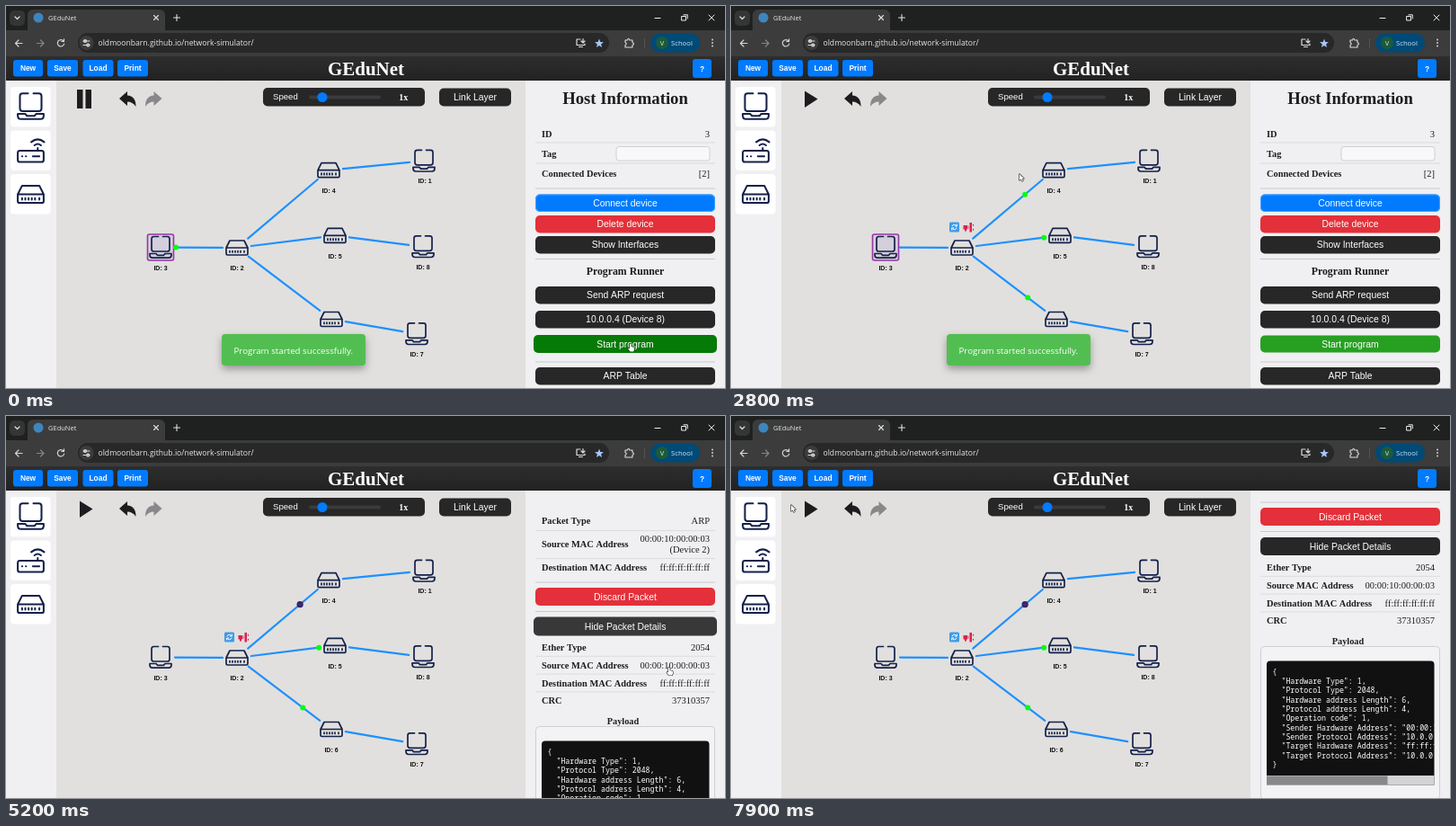
An HTML page with a canvas that plays this animation: 800 px wide and 425 px high, repeating every 8 s.

```html
<!DOCTYPE html>
<html lang="en">
<head>
<meta charset="utf-8">
<title>GEduNet</title>
<style>
html, body { margin: 0; width: 100%; height: 100%; overflow: hidden; background: #e1e0de; }
canvas { display: block; }
</style>
</head>
<body>
<canvas id="stage" width="800" height="425"></canvas>
<script>
const g = document.getElementById('stage').getContext('2d');
const SANS = '"Liberation Sans", Arial, sans-serif';
const SERIF = '"Liberation Serif", "Times New Roman", serif';
const UI = '"Open Sans", "Noto Sans", sans-serif';
const MONO = '"Noto Sans Mono", monospace';
const DARK = '#272728', BLUE = '#007bff', RED = '#e3303a', NAVY = '#14204a', INK = '#1d1d1f';
const LOOP = 8000, STEP = 100;
const ARRIVE = 950, PAUSE = 2300, SELECT = 3700, DETAILS = 4850;

// Basic drawing helpers
function box(x, y, w, h, r, fill, stroke, lw = 1) {
  g.beginPath();
  g.roundRect(x, y, w, h, r);
  if (fill) { g.fillStyle = fill; g.fill(); }
  if (stroke) { g.strokeStyle = stroke; g.lineWidth = lw; g.stroke(); }
}
function text(s, x, y, font, color, align = 'left') {
  g.font = font;
  g.fillStyle = color;
  g.textAlign = align;
  g.fillText(s, x, y);
}
function dot(x, y, r, fill) {
  g.beginPath();
  g.arc(x, y, r, 0, 7);
  g.fillStyle = fill;
  g.fill();
}
function stroke(d, color, lw, x = 0, y = 0, k = 1) {
  g.save();
  g.translate(x, y);
  g.scale(k, k);
  g.lineCap = g.lineJoin = 'round';
  g.strokeStyle = color;
  g.lineWidth = lw;
  g.stroke(new Path2D(d));
  g.restore();
}
function fill(d, color) {
  g.fillStyle = color;
  g.fill(new Path2D(d));
}
function button(label, y, h, color = DARK, hover = false) {
  const o = hover ? 2 : 0;
  box(589 - o, y - o / 4, 200 + 2 * o, h + o / 2, 5, color);
  text(label, 689, y + h / 2 + 3.7, `10.4px ${SANS}`, '#fff', 'center');
}
function rule(y, color = '#c9c9cb') {
  g.fillStyle = color;
  g.fillRect(589, y - 0.5, 200, 1);
}
function row(label, value, y) {
  text(label, 596, y + 3.5, `bold 10.4px ${SERIF}`, INK);
  if (value) text(value, 783, y + 3.5, `10.5px ${SERIF}`, INK, 'right');
}
function heading(s, y, size = 18.7) {
  text(s, 689, y, `bold ${size}px ${SERIF}`, INK, 'center');
}

// Interpolates [time, ...values] keyframes with smooth easing
function at(keys, t) {
  let i = 0;
  while (i < keys.length - 2 && t >= keys[i + 1][0]) i++;
  const [a, b] = [keys[i], keys[i + 1]];
  const u = Math.min(1, Math.max(0, (t - a[0]) / (b[0] - a[0])));
  const e = u * u * (3 - 2 * u);
  return a.slice(1).map((v, n) => v + (b[n + 1] - v) * e);
}

const PC = 'M-2.5-12H-7.5Q-10-12-10-9.5V2Q-10 4.5-7.5 4.5H7.5Q10 4.5 10 2V-9.5Q10-12 7.5-12H2.5' +
  'M-12 7H-5L-3.5 8.8H3.5L5 7H12V8.5Q12 11.7 9 11.7H-9Q-12 11.7-12 8.5Z';
const SWITCH = 'M-8-8H8L12 0V6.5Q12 8 10.5 8H-10.5Q-12 8-12 6.5V0ZM-12 0H12' +
  'M-8 3.5V5M-5 3.5V5M-2 3.5V5M1 3.5V5M4 3.5V5M8 3.5V5';
const ROUTER = 'M-10 0H10Q12 0 12 2V8.5Q12 10.5 10 10.5H-10Q-12 10.5-12 8.5V2Q-12 0-10 0ZM6.5 0V-2.5' +
  'M-8 5.2H-7.8M-4.5 5.2H-4.3M2 5.2H8M3.5-5Q6.5-7.5 9.5-5M.5-8Q6.5-13 12.5-8';

const nodes = {
  1: [465, 172.3, PC, 197], 2: [257, 269, SWITCH, 294], 3: [172, 268.5, PC, 294],
  4: [359, 182.7, SWITCH, 207.5], 5: [366, 255.4, SWITCH, 280.5], 6: [362, 348.5, SWITCH, 373.5],
  7: [457, 364.8, PC, 390], 8: [464, 267.8, PC, 293]
};
const links = [[3, 2], [2, 4], [2, 5], [2, 6], [4, 1], [5, 8], [6, 7]];

// Point on the way from a to b, d pixels past the start of the visible link
function along(a, b, d) {
  const [x, y] = nodes[a], [u, v] = nodes[b], len = Math.hypot(u - x, v - y);
  const k = (d + 16) / len;
  return [x + (u - x) * k, y + (v - y) * k];
}

function browser() {
  g.fillStyle = '#1f2020';
  g.fillRect(0, 0, 800, 28);
  box(4, 5, 17, 17, 5, '#343535');
  stroke('M10 12L12.5 14.5L15 12', '#ddd', 1.2);
  box(24, 4, 153, 30, 6, '#3c3c3c');
  g.fillRect(0, 27, 800, 29);
  dot(36, 13, 5.5, '#3d86bd');
  text('GEduNet', 47, 16, `7.5px ${UI}`, '#e8e8e8');
  stroke('M164.5 10.5L169.5 15.5M169.5 10.5L164.5 15.5M190 9.5V16.5M186.5 13H193.5', '#e2e2e2', 1.1);
  stroke('M722 13.5H728M752 11.5H756.5V16H752ZM754 9.8H758.3V14M782 10L788 16M788 10L782 16', '#eee', 1);
  stroke('M18 41.5H10.5M14 38L10.5 41.5L14 45', '#d5d5d5', 1.2);
  stroke('M34.5 41.5H42M38.5 38L42 41.5L38.5 45', '#858585', 1.2);
  stroke('M64 39A3.7 3.7 0 1 0 64.7 42M64.5 36.8V39.5H61.8', '#d5d5d5', 1.2);
  box(80, 30, 591, 22, 11, '#282828');
  dot(89.5, 41, 8, '#3c3c3c');
  stroke('M86 39H87M90 39H93M86 43.5H89M92.5 43.5H93', '#ddd', 1.1);
  g.strokeStyle = '#ddd';
  for (const [x, y] of [[88, 39], [91.2, 43.5]]) {
    g.beginPath();
    g.arc(x, y, 1.3, 0, 7);
    g.stroke();
  }
  text('oldmoonbarn.github.io/network-simulator/', 102.5, 44.2, `8.6px ${UI}`, '#e6e6e6');
  stroke('M639 37H635V43.5H644V42M637.5 45.5H641.5M642 36.5V40.5M640 39L642 41L644 39', '#ddd', 1.2);
  g.beginPath();
  for (let i = 0; i < 10; i++) {
    const a = i * Math.PI / 5 - Math.PI / 2, r = i % 2 ? 2.2 : 5.2;
    g.lineTo(660 + r * Math.cos(a), 41.8 + r * Math.sin(a));
  }
  g.fillStyle = '#a8c7fa';
  g.fill();
  stroke('M689 38H691.5Q692.5 34.5 694 38H697V40.5Q700 42 697 43.5V46H689V43.5Q691.5 42 689 40.5Z', '#ddd', 1.1);
  g.fillStyle = '#555';
  g.fillRect(710, 36, 1, 11);
  box(717, 30.5, 55, 21, 10.5, '#004a77');
  dot(730, 41, 7, '#1d5a39');
  text('V', 730, 44, `7.5px ${UI}`, '#d8eadf', 'center');
  text('School', 740, 44, `7.7px ${UI}`, '#cfe5fb');
  for (const y of [37.5, 41, 44.5]) dot(786, y, 0.9, '#ddd');
}

function header() {
  const shade = g.createLinearGradient(0, 55, 0, 83);
  shade.addColorStop(0, '#2e2e2f');
  shade.addColorStop(1, '#222223');
  g.fillStyle = shade;
  g.fillRect(0, 56, 800, 27);
  text('GEduNet', 400.5, 77, `bold 21px ${SERIF}`, '#fff', 'center');
  for (const [s, x, w] of [['New', 8, 33], ['Save', 46, 34], ['Load', 85.5, 34], ['Print', 124, 34]]) {
    box(x, 60, w, 18.5, 3, BLUE);
    text(s, x + w / 2, 72.3, `bold 8.4px ${SANS}`, '#fff', 'center');
  }
  box(764, 59, 21, 21, 3, BLUE);
  text('?', 774.5, 72.5, `bold 8.4px ${SANS}`, '#fff', 'center');
}

function sidebar() {
  g.fillStyle = '#f0f0f2';
  g.fillRect(0, 82, 56, 343);
  [[PC, 111.7], [ROUTER, 161], [SWITCH, 209.5]].forEach(([icon, y], i) => {
    box(5, 90 + i * 48.5, 44.5, 44.5, 4, '#fff');
    stroke(icon, NAVY, 1.7, 27.5, y, 1.2);
  });
}

function controls(paused) {
  if (paused) fill('M82 94.5L96.5 103.5L82 113Z', INK);
  else fill('M79 93H85.5V114H79ZM88.5 93H95V114H88.5Z', INK);
  const arrow = 'M126 103L135 95V99.5Q144.5 100 144.5 112Q141 106.5 135 106.5V111Z';
  fill(arrow, INK);
  g.save();
  g.translate(299.5, 0);
  g.scale(-1, 1);
  fill(arrow, '#88888a');
  g.restore();
  box(286, 91, 180, 20.5, 5, DARK);
  text('Speed', 297, 104.3, `9.6px ${SANS}`, '#fff');
  box(337, 99.5, 80, 4, 2, '#3b3b3d');
  dot(352, 101.5, 5.5, BLUE);
  text('1x', 442.3, 104.8, `bold 10px ${SERIF}`, '#fff', 'center');
  box(482, 91.5, 80, 20, 5, DARK);
  text('Link Layer', 522, 105.2, `10.4px ${SANS}`, '#fff', 'center');
}

function network(t) {
  for (const [a, b] of links) {
    const [x, y] = along(a, b, 0), [u, v] = along(b, a, 0);
    stroke(`M${x} ${y}L${u} ${v}`, '#1e90ff', 2.2);
  }
  const picked = t >= SELECT;
  if (!picked) box(157.5, 254, 29, 29, 2, '#d3cfdb', '#9a35a8', 1.6);
  for (const id in nodes) {
    const [x, y, icon, base] = nodes[id];
    stroke(icon, NAVY, 1.7, x, y);
    text('ID: ' + id, x + (id == 1 ? 1 : 0), base, `bold 7px ${SANS}`, '#111', 'center');
  }
  if (t < ARRIVE) {
    dot(...along(3, 2, 1 + t * 0.055), 3, '#0f1');
    return;
  }
  const d = (Math.min(t, PAUSE) - ARRIVE) * 0.0562;
  for (const id of [4, 5, 6]) dot(...along(2, id, d), 3, '#0f1');
  if (picked) {
    const [x, y] = along(2, 4, d);
    dot(x, y, 3.6, '#2c2570');
    dot(x, y, 1.7, '#6a1f48');
  }
  box(243, 240.5, 11, 11, 1.5, '#3d9be9');
  stroke('M246 245A2.8 2.8 0 0 1 251 244.5M251.3 243V245H249.3M251 247A2.8 2.8 0 0 1 246 247.5M245.7 249V247H247.7', '#fff', 1);
  fill('M258.5 244H263V248.5H258.5ZM265.5 241H268V251.5H265.5ZM260 248.5H262V250.5H260Z', '#d8234e');
  fill('M263 244.5H265.5V248H263Z', '#ea8aa2');
  stroke('M269.5 243.5V244M269.5 248.5V249', '#d8234e', 1.3);
}

function toast(alpha) {
  if (alpha <= 0) return;
  g.save();
  g.globalAlpha = alpha;
  g.shadowColor = '#0005';
  g.shadowBlur = 9;
  g.shadowOffsetY = 4;
  box(240, 365, 160, 35, 4, '#52be52');
  g.shadowColor = 'transparent';
  text('Program started successfully.', 253.5, 386.5, `9.75px ${UI}`, '#fff');
  g.restore();
}

function hostPanel(t) {
  heading('Host Information', 108.7);
  row('ID', '3', 142);
  rule(152, '#dcdcde');
  row('Tag', '', 164);
  box(679, 156.5, 104, 15.5, 3, '#f8f8fa', '#d0d0d3');
  rule(175, '#dcdcde');
  row('Connected Devices', '[2]', 186.5);
  rule(203);
  button('Connect device', 209.5, 19.5, BLUE);
  box(589.5, 210, 199, 18.5, 5, null, '#4aa0ff');
  button('Delete device', 233, 19.5, RED);
  button('Show Interfaces', 256, 19.5);
  rule(281.5);
  heading('Program Runner', 299, 11.8);
  button('Send ARP request', 312, 19.5);
  button('10.0.0.4 (Device 8)', 339, 19.5);
  const hover = t < 400;
  button('Start program', 366.5, 19, hover ? '#067a06' : '#27a022', hover);
  rule(396);
  button('ARP Table', 402, 19.5);
}

const payload = ['{', '  "Hardware Type": 1,', '  "Protocol Type": 2048,',
  '  "Hardware address Length": 6,', '  "Protocol address Length": 4,', '  "Operation code": 1,',
  '  "Sender Hardware Address": "00:00:10:00:00:03",', '  "Sender Protocol Address": "10.0.0.1",',
  '  "Target Hardware Address": "ff:ff:ff:ff:ff:ff",', '  "Target Protocol Address": "10.0.0.4"', '}'];

function packetPanel(t) {
  const open = t >= DETAILS, mac = '00:00:10:00:00:03', all = 'ff:ff:ff:ff:ff:ff';
  g.translate(0, -at([[5000, 0], [5200, 46], [5700, 135]], t)[0]);
  heading('Packet Information', 129);
  row('Packet Type', 'ARP', 162.5);
  rule(173.5, '#dcdcde');
  row('Source MAC Address', '', 188.5);
  row('', mac, 182.5);
  row('', '(Device 2)', 194.5);
  rule(204.5, '#dcdcde');
  row('Destination MAC Address', all, 214);
  rule(231);
  button('Discard Packet', 237, 20, RED);
  rule(263.5);
  const hover = t > 4500 && t < 5400;
  button(`${open ? 'Hide' : 'Show'} Packet Details`, 270, 20, hover ? '#383839' : DARK, hover);
  if (!open) return;
  [['Ether Type', '2054'], ['Source MAC Address', mac], ['Destination MAC Address', all], ['CRC', '37310357']]
    .forEach(([label, value], i) => {
      row(label, value, 303.5 + i * 19.8);
      if (i) rule(293.5 + i * 19.8, '#dcdcde');
    });
  text('Payload', 686.5, 388.5, `bold 10.3px ${SERIF}`, INK, 'center');
  box(589.5, 391.5, 199, 170, 4, '#f3f3f5', '#cfcfd2');
  box(596, 407.5, 186.5, 138, [4, 4, 0, 0], '#111112');
  g.save();
  g.clip();
  payload.forEach((s, i) => text(s, 602.5, 422.5 + i * 10.35, `500 8.28px ${MONO}`, '#fff'));
  g.fillStyle = '#d3d3d5';
  g.fillRect(596, 535, 187, 11);
  g.fillStyle = '#88888a';
  g.fillRect(596, 535.5, 134.5, 9.5);
  g.restore();
}

const path = [[0, 694, 376], [300, 694, 376], [1500, 161, 119], [2100, 87, 104], [2350, 87, 104],
  [2800, 321, 187], [3300, 326, 209], [3700, 326, 209], [4100, 535, 260], [4600, 737, 280],
  [5900, 737, 280], [6700, 709, 332], [7100, 709, 332], [7900, 67, 99]];

function cursor(t) {
  const [x, y] = at(path, t);
  const over = (from, to) => t >= from && t <= to;
  g.save();
  g.translate(x, y);
  let d = 'M0 0V7L1.7 5.4L2.8 8L4 7.4L2.9 5H5Z';
  if (over(0, 400) || over(1900, 2400) || over(3200, 3750) || over(4500, 5400))
    d = 'M0 0Q1.3-1 1.6 .5V3L4.5 3.8Q5.2 4.2 5 6L4.3 8.5H.5L-1.8 5.5Q-1.5 4.3 0 5.3Z';
  if (over(6200, 7200)) stroke('M-1.2-4H1.2M0-4V4M-1.2 4H1.2', '#ddd', 0.8);
  else {
    stroke(d, '#222', 1.2);
    fill(d, '#fff');
  }
  g.restore();
}

function draw(t) {
  g.fillStyle = '#e1e0de';
  g.fillRect(0, 0, 800, 425);
  network(t);
  controls(t >= PAUSE);
  toast(Math.min(1, (3400 - t) / 400));
  sidebar();
  g.save();
  g.fillStyle = '#f0eff1';
  g.fillRect(578, 82, 222, 343);
  (t < SELECT ? hostPanel : packetPanel)(t);
  g.restore();
  header();
  browser();
  cursor(t);
}

function tick() {
  draw(Math.floor(performance.now() % LOOP / STEP) * STEP);
  requestAnimationFrame(tick);
}
tick();
</script>
</body>
</html>
```
